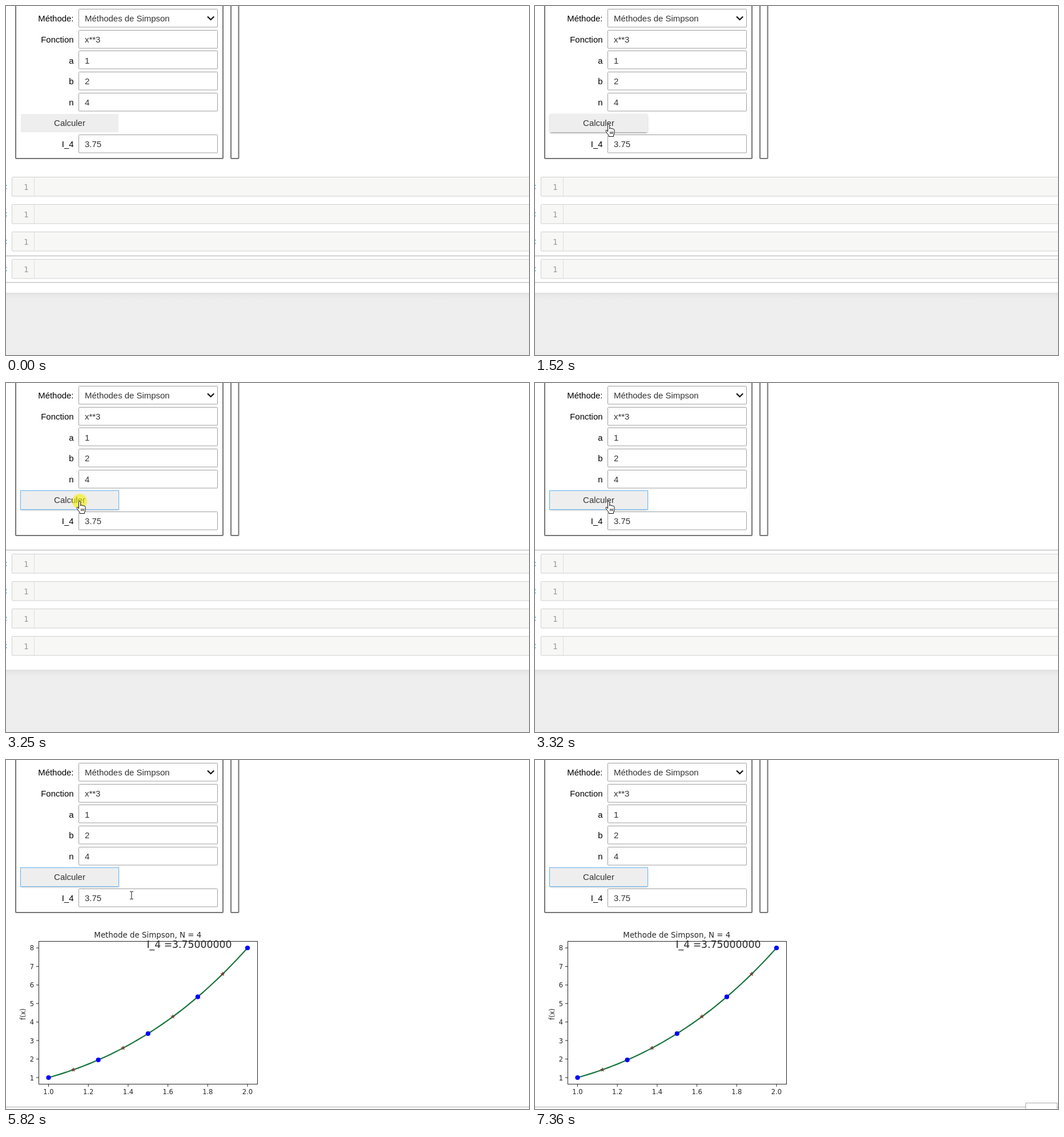
An HTML page that plays this animation: 916x611 px, repeating every 8000 ms.

```html
<!DOCTYPE html>
<html lang="fr">
<head>
<meta charset="utf-8">
<style>
  html, body { margin: 0; width: 100%; height: 100%; overflow: hidden; background: #fff; }
  svg { position: absolute; left: 0; top: 0; width: 916px; height: 611px; overflow: hidden; }
  .form { font: 14.95px "Liberation Sans", Arial, sans-serif; }
  .value, #button { fill: #333; color: #333; }
  .box { fill: #fff; stroke: #9e9e9e; }
  .panel { fill: none; stroke: #757575; stroke-width: 2; }
  .cell { fill: #f7f7f6; stroke: #cfcfcf; }
  .line { stroke: #ababab; fill: none; }
  .number { font: 14px "DejaVu Sans Mono", monospace; fill: #999; }
  .plot { font: 11.5px "DejaVu Sans", sans-serif; fill: #262626; }
  .axis { fill: none; stroke: #262626; }
  #button {
    position: absolute; left: 26px; top: 189px; width: 171px; height: 32px;
    background: #eee; text-align: center; line-height: 32px;
  }
  #button.raised {
    box-shadow: 0 2px 2px rgba(0,0,0,.14), 0 3px 1px -2px rgba(0,0,0,.2), 0 1px 5px rgba(0,0,0,.12);
  }
  #button.focused { outline: 1px solid #64b5f6; }
  #footer {
    position: absolute; left: 0; top: 502px; width: 916px; height: 109px;
    background: linear-gradient(#dfdfdf, #e9e9e9 5px, #eee 12px);
  }
</style>
</head>
<body>
<div id="footer"></div>
<svg id="page"></svg>
<div id="button" class="form">Calculer</div>
<svg id="overlay">
  <circle id="click" cx="129" cy="207" r="13" fill="#f5f000" opacity=".6"/>
  <g id="tip"><rect class="line" x="859.5" y="600.5" width="55" height="20" style="fill:#fff"/></g>
  <g id="cursor" stroke="#111" fill="#fff" stroke-linejoin="round">
    <path id="arrow" d="M.5.5V14.5L3.8 11.4 6.1 16.5 8.2 15.6 6 10.6H10.5Z"/>
    <path id="hand" d="M-1.5 13V1.6a1.6 1.6 0 0 1 3.2 0V8q0-1.3 1.6-1.3t1.6 1.6q.2-1 1.5-.9t1.4 1.6q.3-.8 1.2-.5t1 1.8v4.5q0 2.5-1.5 4.2V21.5H.2v-2Q-2 17-4.7 12.6q-.9-2 .8-2.3 1.3 0 2.4 2.7ZM2.8 13v4M5 13v4M7.2 13v4"/>
    <path id="beam" fill="none" d="M-3-6.5h2.5L0-6 .5-6.5H3M0-6V6M-3 6.5h2.5L0 6 .5 6.5H3"/>
  </g>
</svg>
<script>
const LOOP = 8000;
const $ = id => document.getElementById(id);
const range = n => [...Array(n).keys()];
const rect = (cls, x, y, w, h) =>
  `<rect class="${cls}" x="${x}" y="${y}" width="${w}" height="${h}" rx="1"/>`;
const text = (cls, x, y, content, anchor = 'start', extra = '') =>
  `<text class="${cls}" x="${x}" y="${y}" text-anchor="${anchor}" ${extra}>${content}</text>`;
const path = (d, attrs) => `<path d="${d}" ${attrs}/>`;

// Form
const rowTop = row => Math.floor(5.6 + 36.6 * row) + .5;
const fields = [
  ['Méthode:', 'Méthodes de Simpson', 0], ['Fonction', 'x**3', 1], ['a', '1', 2],
  ['b', '2', 3], ['n', '4', 4], ['I_4', '3.75', 6]
];
const form = rect('panel', 17, -9, 363, 276) + rect('panel', 394, -9, 13.5, 276) +
  fields.map(([label, value, row]) => {
    const top = rowTop(row), base = 27.3 + 36.6 * row;
    return rect('box', 127.5, top, 243, 31.5) +
      text('', 118.5, base, label, 'end') + text('value', 138, base, value);
  }).join('') +
  path('M353 18.5L358.6 24 364.2 18.5', 'fill="none" stroke="#111" stroke-width="2.3"');

// Empty code cells
const cellTop = i => Math.round(299 + 47.9 * i) + .5;
const cells = range(4).map(i => {
  const y = cellTop(i);
  return rect('cell', 10.5, y, 930, 33.5) +
    path(`M49.5 ${y}v33.5`, 'stroke="#ddd"') +
    path(`M0 ${y + 14.5}h1.5M0 ${y + 20}h1.5`, 'stroke="#5bbcd6" stroke-width="2"') +
    text('number', 31, y + 22.5, '1');
}).join('');

// Chart of x³ on [1, 2]
const px = x => 74.5 + 348.5 * (x - 1);
const py = y => 556 - 32.43 * (y - 1);
const star = (x, y) => 'M' + range(10).map(i => {
  const r = i % 2 ? 1.8 : 4.3, a = i * Math.PI / 5;
  return [x + r * Math.sin(a), y - r * Math.cos(a)];
}).join('L') + 'Z';
const curve = 'M' + range(41).map(i => 1 + i / 40).map(x => [px(x), py(x ** 3)]).join('L');
const chart =
  `<rect class="axis" x="57.5" y="317.5" width="383" height="250"/>` +
  range(8).map(i => {
    const y = py(i + 1);
    return path(`M57 ${y}h-4`, 'class="axis"') + text('', 49, y + 4.5, i + 1, 'end');
  }).join('') +
  range(6).map(i => {
    const x = 1 + i / 5;
    return path(`M${px(x)} 568v4`, 'class="axis"') + text('', px(x), 585, x.toFixed(1), 'middle');
  }).join('') +
  path(curve, 'fill="none" stroke="#18743c" stroke-width="2.2"') +
  range(5).map(i => 1 + i / 4).map(x =>
    `<circle cx="${px(x)}" cy="${py(x ** 3)}" r="4.1" fill="#00f"/>`).join('') +
  range(4).map(i => 1.125 + i / 4).map(x =>
    path(star(px(x), py(x ** 3)), 'fill="#77402f"')).join('') +
  text('', 248.3, 311, 'Methode de Simpson, N = 4', 'middle', 'font-size="13.4"') +
  text('', 246.5, 329.3, 'I_4 =3.75000000', 'start', 'font-size="17.25"') +
  text('', 0, 0, 'f(x)', 'middle', 'transform="translate(33.5 445) rotate(-90)"');

$('page').innerHTML = `<g class="form">${form}</g><g id="cells">${cells}</g>` +
  `<g class="plot" id="chart">${chart}</g><path class="line" id="selection"/>`;

// Pointer moves: start, end, number of steps, quadratic curve points
const moves = [
  [280, 430, 3, [693, 582], [537, 537], [381, 492]],
  [660, 1370, 10, [381, 492], [215, 345], [130, 207]],
  [1520, 1520, 1, [130, 207], [130, 207], [129, 207]],
  [5820, 6130, 5, [129, 207], [341, 258], [706, 546]],
  [6350, 6510, 3, [706, 546], [772, 585], [839, 625]]
];

function pointer(t) {
  const move = moves.filter(m => t >= m[0]).pop();
  if (!move) return [-50, -50];
  const [start, end, steps, a, b, c] = move;
  const step = t >= end ? steps : 1 + Math.floor((t - start) / (end - start) * (steps - 1));
  const p = step / steps, q = 1 - p;
  return a.map((v, i) => q * q * v + 2 * p * q * b[i] + p * p * c[i]);
}

const inside = (x, y, left, top, w, h) => x > left && x < left + w && y > top && y < top + h;
const show = (id, visible) => { $(id).style.display = visible ? '' : 'none'; };

function draw(t) {
  const [x, y] = pointer(t);
  const plotted = t >= 3560, focused = t >= 3250;
  const hover = inside(x, y, 26, 188, 171, 34);
  const editable = fields.some(f => f[2] && inside(x, y, 127, rowTop(f[2]), 244, 32)) ||
    !plotted && range(4).some(i => inside(x, y, 50, cellTop(i), 866, 34));

  show('cells', !plotted);
  show('footer', !plotted);
  show('chart', plotted);
  $('selection').setAttribute('d',
    plotted ? 'M0 607.5H916' : focused ? 'M0 292.5H916' : 'M0 437.5H916M0 484H916');
  $('button').className = `form ${hover || focused ? 'raised' : ''} ${focused ? 'focused' : ''}`;
  show('click', t >= 3180 && t < 3320);
  show('tip', t >= 7290);
  $('tip').style.opacity = t < 7360 ? .5 : 1;

  show('hand', hover);
  show('beam', editable);
  show('arrow', !hover && !editable);
  $('cursor').setAttribute('transform', `translate(${x} ${y})`);
}

function frame() {
  draw(performance.now() % LOOP);
  requestAnimationFrame(frame);
}
frame();
</script>
</body>
</html>
```
